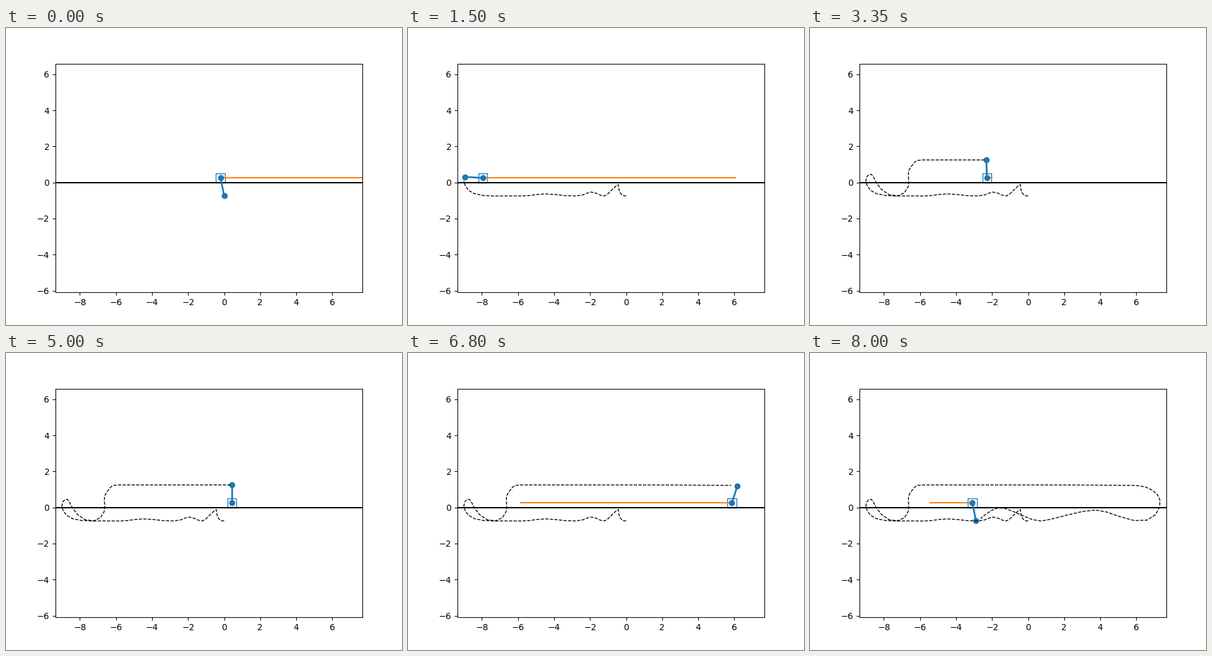
Animation of 640 by 480 pixels, one loop 9250 ms. Source, as a matplotlib script:

```python
import numpy as np
import matplotlib.pyplot as plt
from matplotlib.animation import FuncAnimation
from matplotlib.patches import Rectangle

FRAMES, LAST, STEP_MS = 185, 160, 50
LENGTH, SIDE = 1.0, 0.5
PIVOT_Y = SIDE / 2
PUSH = 14


def ease(points, t):
    """Smooth path through (time, value) points, at rest at each turning point."""
    k, v = np.array(points, float).T
    h = np.diff(k)
    a, b = np.diff(v)[:-1] / h[:-1], np.diff(v)[1:] / h[1:]
    slope = np.zeros(len(k))
    same = a * b > 0
    slope[1:-1][same] = 2 * a[same] * b[same] / (a + b)[same]
    j = np.clip(np.searchsorted(k, t, side="right") - 1, 0, len(h) - 1)
    f = (t - k[j]) / h[j]
    rise = f * f * (3 - 2 * f)
    tangent = slope[j] * f * (1 - f) ** 2 - slope[j + 1] * f * f * (1 - f)
    return v[j] + (v[j + 1] - v[j]) * rise + h[j] * tangent


def drive(t):
    """Cart while balancing: slows to a steady drift, then runs away."""
    return (0.083 + 0.05 * (t - 100)
            - 3 * np.exp((48 - t) / 14) + 3.52 * np.exp((t - 134) / 16))


steps = np.arange(LAST + 1)

swing_up = [(0, -0.2), (5, 0.5), (12.6, -2.67), (14.4, -2.78), (27, -8.01),
            (28.5, -8.02), (36, -7.33), (41, -7.635), (45, -6.75)]
balance = [(t, drive(t)) for t in range(48, 134, 5)]
swing_down = [(137, 6.05), (140, 6.32), (143, 6.28), (147, 4.65),
              (151, 0.75), (155, -2.3), (158.5, -3.16), (160, -3.093)]
cart_x = ease(swing_up + balance + swing_down, steps)

# Pole angle from hanging straight down
angle = ease([(0, 0.2), (5.2, -1.2), (12, 0.675), (18, -0.49), (22.5, 0.12),
              (31.6, -1.79), (40, 1.42), (44, 2.42), (48, 3.18),
              (100, np.pi), (135, 2.91), (140, 1.75), (147, -1.17),
              (155.5, 1.31), (163, -0.4)], steps)

# Full pushes of alternating sign, then the gentle balancing force
switches = np.searchsorted([3, 21, 35, 42], steps, side="right")
gentle = np.interp(steps, *zip(
    (47, -1), (57, 0.2), (74, 0.33), (100, 0.05), (127, 0.2), (129, -1.15),
    (133, -10.3), (140, -13.6), (150, -8), (152, 10), (157, 11),
    (158, -7), (160, -2.35)))
force = np.where(steps < 47, PUSH * (1 - 2 * (switches % 2)), gentle)

tip_x = cart_x + LENGTH * np.sin(angle)
tip_y = PIVOT_Y - LENGTH * np.cos(angle)

fig, ax = plt.subplots(figsize=(6.4, 4.8), dpi=100)
ax.set_xlim(-9.35, 7.665)
ax.set_ylim(PIVOT_Y - 6.34, PIVOT_Y + 6.34)
ax.axhline(0, color="black", lw=1.5)
cart = ax.add_patch(Rectangle((0, 0), SIDE, SIDE, fill=False, ec="C0", lw=1))
push, = ax.plot([], [], color="C1", lw=1.5)
pole, = ax.plot([], [], "o-", color="C0", lw=2)
trace, = ax.plot([], [], "k--", lw=1)


def draw(n):
    i = min(n, LAST)
    x = cart_x[i]
    cart.set_x(x - SIDE / 2)
    push.set_data([x, x + force[i]], [PIVOT_Y, PIVOT_Y])
    pole.set_data([x, tip_x[i]], [PIVOT_Y, tip_y[i]])
    trace.set_data(tip_x[:i], tip_y[:i])
    return cart, push, pole, trace


anim = FuncAnimation(fig, draw, frames=FRAMES, interval=STEP_MS,
                     repeat=True, repeat_delay=0)
plt.show()
```
